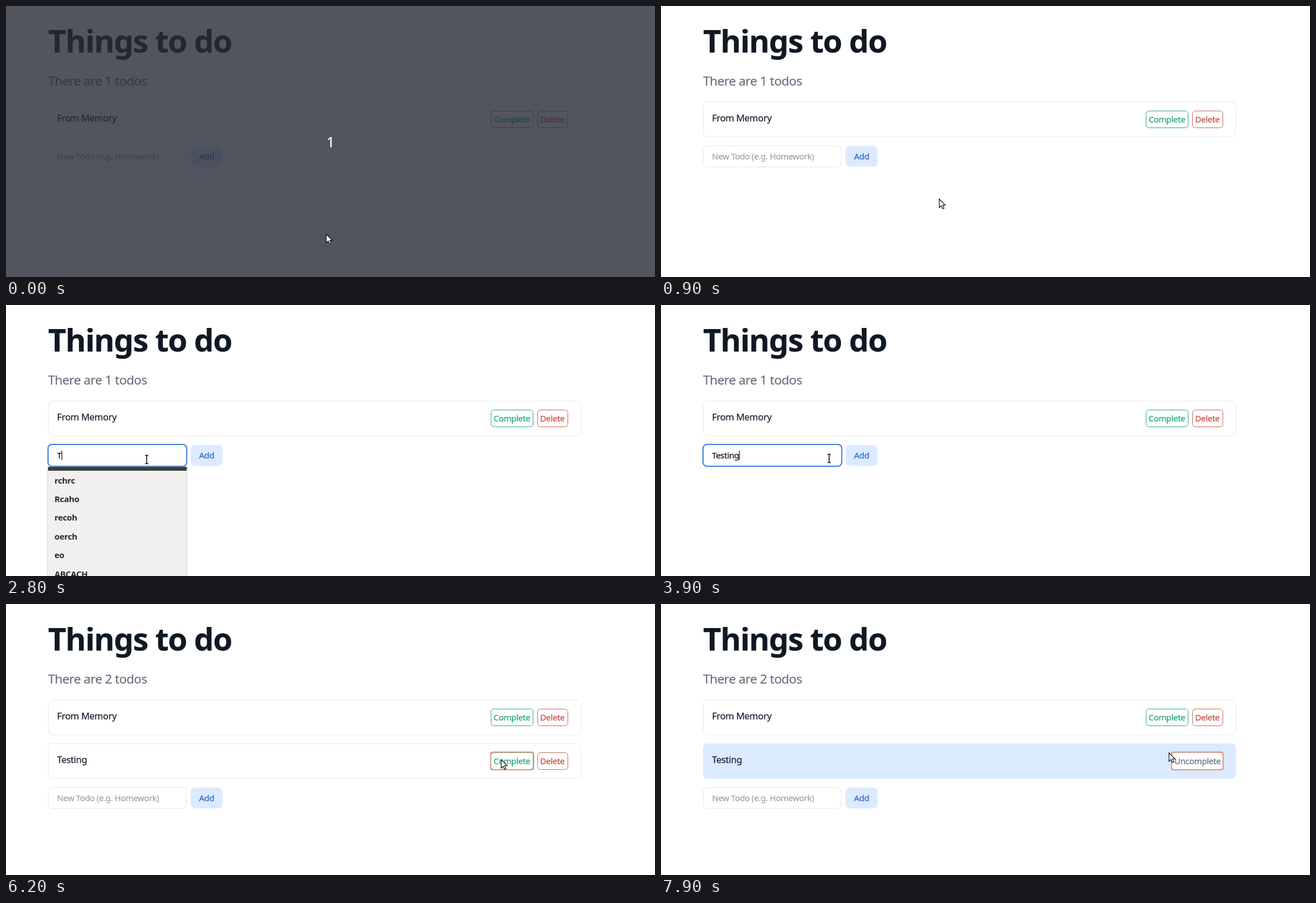
Animation of 1158x484 px, one loop 8000 ms. Source, as an HTML page:

```html
<!DOCTYPE html>
<html lang="en">
<head>
<meta charset="utf-8">
<title>Things to do</title>
<style>
  html, body { margin: 0; width: 100%; height: 100%; overflow: hidden; background: #fff; }
  svg { display: block; }
  text { font: 15px "Noto Sans", "Open Sans", sans-serif; letter-spacing: -.022em; white-space: pre; stroke-width: .25px; }
  text.title { font-size: 56px; font-weight: 700; letter-spacing: -.025em; }
  text.count { font-size: 22.5px; }
  text.item { font-size: 16.6px; }
  text.option { font-weight: 600; stroke-width: 0; }
  text.countdown { font-size: 26px; text-anchor: middle; }
</style>
</head>
<body>
<svg id="stage" width="1158" height="484" viewBox="0 0 1158 484"></svg>
<script>
const LOOP = 8000, STEP = 100;
const INK = '#101823', GRAY = '#6b7280', LINE = '#e5e7eb', PALE = '#dbeafe';
const BLUE = '#3b7dd8', GREEN = '#22a87a', RED = '#cb4f48', FOCUS = '#e0957a';
const stage = document.getElementById('stage');

// Pointer path: time, x, y
const path = [
  [0, 571, 407], [100, 568, 458], [200, 577, 443], [400, 607, 375], [700, 607, 375],
  [900, 496, 344], [1400, 496, 344], [1600, 332, 285], [1700, 258, 273], [1800, 251, 276],
  [3800, 251, 276], [3900, 300, 274], [4100, 348, 261], [5000, 348, 261], [5200, 749, 283],
  [5500, 749, 283], [5700, 897, 282], [5800, 883, 277], [7200, 883, 277], [7400, 881, 277],
  [7500, 881, 277], [7600, 866, 276], [7700, 870, 275], [7900, 906, 265]
];
// Times at which the field text gains its next letters
const typing = [[2500, 'T'], [3000, 'Te'], [3200, 'Test'], [3500, 'Testi'], [3600, 'Testin'], [3800, 'Testing']];
const options = ['rchrc', 'Rcaho', 'recoh', 'oerch', 'eo', 'ABCACH'];

const text = (x, y, str, fill, cls = '') =>
  `<text x="${x}" y="${y}" fill="${fill}" stroke="${fill}" class="${cls}">${str}</text>`;
const rect = (x, y, w, h, r, fill, stroke = 'none', weight = 1) =>
  `<rect x="${x}" y="${y}" width="${w}" height="${h}" rx="${r}" fill="${fill}" stroke="${stroke}" stroke-width="${weight}"/>`;

function pointerAt(t) {
  const next = path.findIndex(p => p[0] > t);
  if (next < 0) return path[path.length - 1].slice(1);
  const [t0, x0, y0] = path[next - 1], [t1, x1, y1] = path[next];
  const k = (t - t0) / (t1 - t0);
  return [x0 + (x1 - x0) * k, y0 + (y1 - y0) * k];
}

function button(x, y, w, label, color, border) {
  return rect(x + .5, y + .5, w, 30, 5, '#fff', border) + text(x + 5, y + 21, label, color);
}

function card(y, label, done, focused) {
  const focusRing = (x, w) => focused ? rect(x, y + 15.5, w, 31.5, 3, 'none', FOCUS, 1.8) : '';
  const actions = done
    ? button(911, y + 16, 91, 'Uncomplete', GRAY, '#c5c8ce') + focusRing(911, 92)
    : button(865, y + 16, 75, 'Complete', GREEN, '#2fa886') + focusRing(865, 76.5) +
      button(948, y + 16, 54, 'Delete', RED, '#c7655f');
  return rect(75.5, y + .5, 950, 62, 7, done ? PALE : '#fff', done ? PALE : LINE) +
    text(91, y + 35, label, '#1f2433', 'item') + actions;
}

function form(y, value, active, hovered, focused) {
  const field = active
    ? rect(75, y, 247.5, 39, 7, '#fff', BLUE, 2)
    : rect(75.5, y + .5, 246, 38, 7, '#fff', LINE);
  const content = value ? text(91, y + 25, value, INK, 'value')
    : text(91, y + 25, 'New Todo (e.g. Homework)', '#9ca3af');
  const ring = focused ? rect(329.5, y + .5, 57, 38, 1, 'none', '#eb9f7f', 1.5) : '';
  const caret = active ? `<g id="caret">${rect(91, y + 11, 1.2, 17, 0, '#111')}</g>` : '';
  return field + content + rect(329.5, y + 1, 57, 37, focused ? 2 : 8, hovered ? '#bfdbfe' : PALE) +
    ring + text(344.5, y + 25, 'Add', '#2f66c8') + caret;
}

function popup(hasBar) {
  return rect(74, 289, 249, 200, 0, '#f2f0ee', '#d8d5d2') +
    (hasBar ? rect(75, 289, 247.5, 7, 1, '#3c3c3c') : '') +
    options.map((name, i) => text(86.5, 318.5 + 33.4 * i, name, '#25292c', 'option')).join('');
}

function pointer(x, y, beam) {
  const move = `transform="translate(${x} ${y})"`;
  if (beam) {
    const d = 'M-3-7.5H-1L0-6.5 1-7.5H3M0-6.5V6.5M-3 7.5H-1L0 6.5 1 7.5H3';
    return `<g ${move} fill="none"><path d="${d}" stroke="#fff" stroke-width="3.4"/>` +
      `<path d="${d}" stroke="#111" stroke-width="1.6"/></g>`;
  }
  return `<path ${move} d="M.5.8V16L4 12.7 6.4 18.3 9 17.2 6.7 11.7H11.2Z" fill="#fff" stroke="#111" stroke-width="1.2"/>`;
}

function draw(t) {
  const within = (a, b) => t >= a && t < b;
  const added = t >= 5000, done = t >= 6500;
  const typed = typing.filter(([at]) => t >= at).pop();
  const [x, y] = pointerAt(t);
  const inField = !added && x > 75 && x < 323 && y > 249 && y < 288;
  const overAdd = !added && x > 329 && x < 387 && y > 249 && y < 288;

  stage.innerHTML =
    text(75, 83, 'Things to do', INK, 'title') +
    text(75, 141.5, `There are ${added ? 2 : 1} todos`, GRAY, 'count') +
    card(171, 'From Memory') +
    (added ? card(249, 'Testing', done, t >= 6200) : '') +
    form(added ? 327 : 249, typed && !added ? typed[1] : '', within(2000, 4500), overAdd, within(4500, 6200)) +
    (within(2600, 2900) ? popup(t >= 2800) : '') +
    (t < 100 ? rect(0, 0, 1158, 484, 0, 'rgba(39,43,54,.8)') + text(579, 252, '1', '#fff', 'countdown') : '') +
    pointer(x, y, inField);

  const caret = document.getElementById('caret'), value = stage.querySelector('.value');
  if (caret && value) caret.setAttribute('transform', `translate(${value.getComputedTextLength()} 0)`);
}

let shown = -1;
function frame() {
  const t = Math.floor(performance.now() % LOOP / STEP) * STEP;
  if (t !== shown) draw(shown = t);
  requestAnimationFrame(frame);
}
frame();
</script>
</body>
</html>
```
